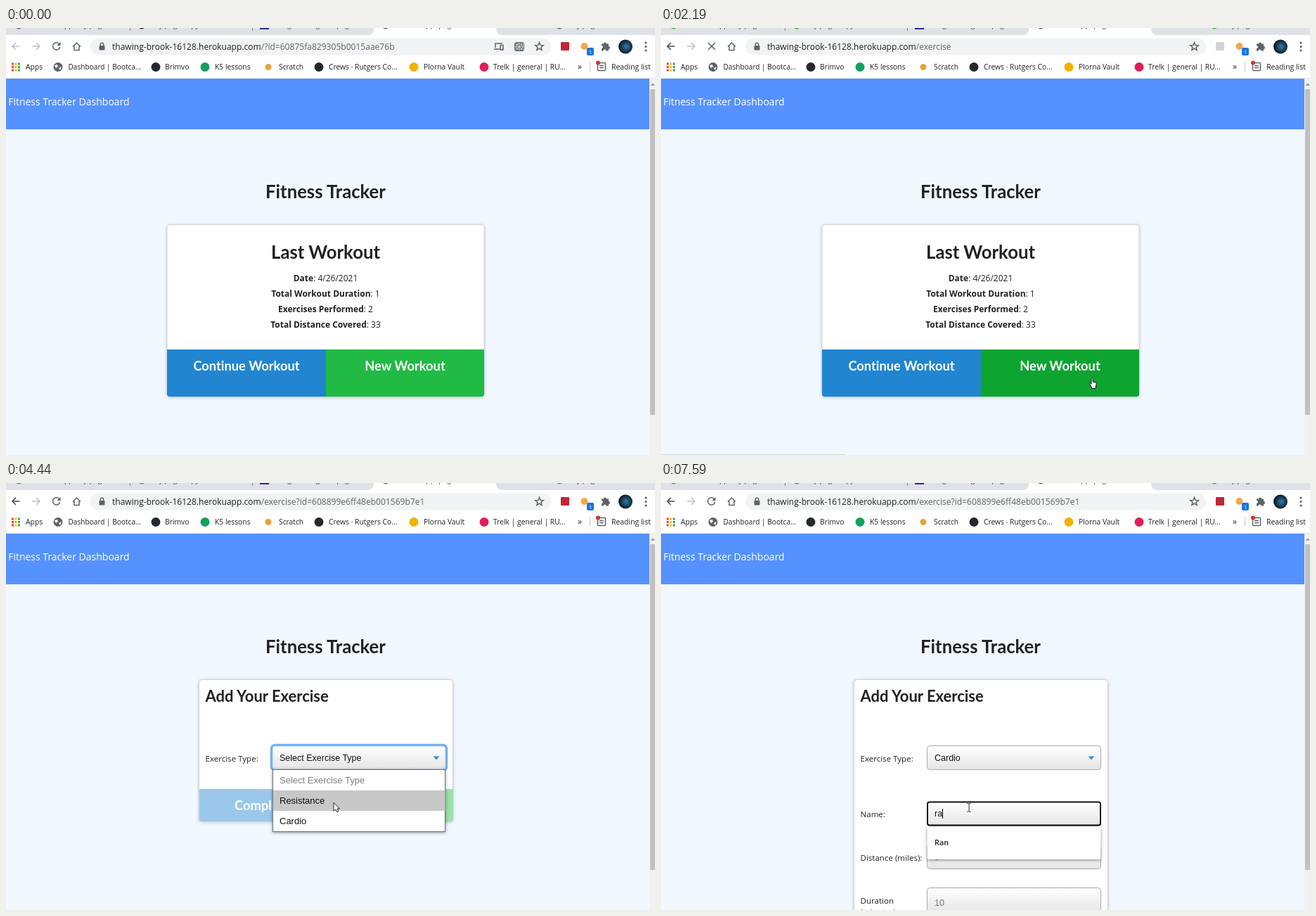
Animation of 923x607 px, one loop 8 s. Source, as an HTML page:

```html
<!DOCTYPE html>
<html lang="en">
<head>
<meta charset="utf-8">
<title>Fitness Tracker</title>
<style>
  html, body { margin: 0; width: 100%; height: 100%; overflow: hidden; background: #f1f8ff; }
  svg { display: block; width: 923px; height: 607px; }
  text { white-space: pre; font-variant-ligatures: none; }
  .ui { font-family: "Open Sans", "Noto Sans", sans-serif; }
  .head { font-family: Lato, sans-serif; font-weight: 700; }
  .ctl { font-family: "Liberation Sans", Arial, sans-serif; }
  .line { fill: none; stroke: #5f6368; stroke-width: 1.5; }
  .card { fill: #fff; stroke: #d0d3d7; filter: drop-shadow(0 1px 2px rgba(0, 0, 0, .2)); }
  .popup { fill: #fff; filter: drop-shadow(0 1px 2px rgba(0, 0, 0, .45)); }
</style>
</head>
<body>
<svg id="stage" viewBox="0 0 923 607" xmlns="http://www.w3.org/2000/svg"></svg>
<script>
const LOOP = 8000;
const INK = '#212121';
const GRAY = '#5f6368';
const H1 = 25.7, H2 = 22, BUTTON = 18.3;

// Markup helpers
const text = (cls, x, y, size, fill, body, extra = '') =>
  `<text class="${cls}" x="${x}" y="${y}" font-size="${size}" fill="${fill}" ${extra}>${body}</text>`;
const rect = (x, y, w, h, fill, extra = '') =>
  `<rect x="${x}" y="${y}" width="${w}" height="${h}" fill="${fill}" ${extra}/>`;
const dot = (x, y, r, fill, extra = '') =>
  `<circle cx="${x}" cy="${y}" r="${r}" fill="${fill}" ${extra}/>`;
const path = (d, extra = 'class="line"') => `<path d="${d}" ${extra}/>`;
const group = (id, body) => `<g id="${id}">${body}</g>`;
const mid = 'text-anchor="middle"';

const field = (y, id) =>
  rect(378.5, y + .5, 247, 34, 'url(#shade)', `rx="4" stroke="#a9a9a9" id="${id}"`);

function buttonPair(x0, xm, x1, y0, y1, left, right, id) {
  return path(`M${x0} ${y0}H${xm}V${y1}H${x0 + 4}a4 4 0 0 1-4-4Z`, `fill="${left}"`) +
    path(`M${xm} ${y0}H${x1}V${y1 - 4}a4 4 0 0 1-4 4H${xm}Z`, `fill="${right}" id="${id}"`);
}

function tabStrip() {
  const labels = [[33, 'Workout app, my page'], [208, 'my page copy'], [382, 'assignment guide page'],
    [555, 'Fitness app, page'], [802, 'my page']];
  const icons = [[18, GRAY], [193, INK], [367, '#26348b'], [540, GRAY], [787, GRAY]];
  return rect(0, 0, 923, 72, '#fff') +
    path('M0 0H523V2a8 8 0 0 1-8 8H0Z', 'fill="#dee1e6"') +
    path('M923 0H697V2a8 8 0 0 0 8 8H923Z', 'fill="#dee1e6"') +
    path('M176.5 0V4M350.5 0V4', 'stroke="#80868b"') +
    labels.map(([x, s]) => text('ui', x, -1, 10.4, '#45494d', s)).join('') +
    icons.map(([x, c], i) => i === 2 ? rect(361, -6, 13, 8, c) : dot(x, -4, 5.5, c, `id="tab${i}"`)).join('');
}

function toolbar() {
  const star = Array.from({ length: 10 }, (_, i) => {
    const r = i % 2 ? 2.6 : 6, a = i * Math.PI / 5;
    return `${758.5 + r * Math.sin(a)} ${26.5 - r * Math.cos(a)}`;
  }).join('L');
  const squares = [[725, 22], [731, 22], [725, 28], [731, 28]]
    .map(([x, y]) => rect(x, y, 3.5, 3.5, 'none', 'stroke="#5f6368" stroke-width="1.4"')).join('');
  return path('M19.5 26H9M14 21L9 26L14 31', 'class="line" id="back"') +
    path('M37 26H48M43 21L48 26L43 31', 'fill="none" stroke="#bdc1c6" stroke-width="1.5"') +
    group('reload', path('M76 23a5.2 5.2 0 1 0 .8 4') + path('M77.5 20V25H72.5Z', `fill="${GRAY}"`)) +
    group('stop', path('M67 21L77 31M77 21L67 31')) +
    path('M95 26.5L100.5 21L106 26.5M97 25.5V31.5H104V25.5') +
    rect(120, 14.5, 655, 24, '#f1f3f4', 'rx="12"') +
    rect(132.5, 25, 8, 6.5, GRAY, 'rx="1"') + path('M134.3 25V23.5a2.2 2.2 0 0 1 4.4 0V25') +
    text('ui', 151, 30.8, 12.05, INK, '', 'id="url"') +
    group('pageTools', path('M694 30H702M696 28V22H706M703 24.5H707V31H703Z') +
      rect(723.5, 20.5, 13, 12, 'none', 'rx="2" stroke="#5f6368"') + squares) +
    path(`M${star}Z`) +
    rect(789, 20, 12, 12, '#c0263a', 'id="shield" rx="1"') +
    dot(822.5, 26, 5, '#f3a84a') + rect(826, 28, 10, 11, '#1a73e8', 'rx="2"') +
    text('ui', 831, 36.8, 8, '#fff', '1', mid) +
    path('M847 22.5H850a2 2 0 1 1 4 0H857V26a2 2 0 1 1 0 4V32.5H853.5a2 2 0 0 0-4 0H847V29a2 2 0 0 0 0-4Z', `fill="${GRAY}"`) +
    dot(881, 26.5, 10, 'url(#avatar)') +
    [21, 26.5, 32].map(y => dot(910, y, 1.6, GRAY)).join('');
}

function bookmarks() {
  const hues = ['#ea4335', '#fbbc04', '#34a853', '#4285f4'];
  const apps = Array.from({ length: 9 }, (_, i) =>
    rect(8 + i % 3 * 4.5, 49.5 + Math.floor(i / 3) * 4.5, 3, 3, hues[(i + Math.floor(i / 3)) % 4])).join('');
  const marks = [[213, '#24292e', 226, 'Brimvo'], [283, '#12a15b', 297, 'K5 lessons'],
    [373, '#e9a13b', 388, 'Scratch'], [445, '#24292e', 459, 'Crews · Rutgers Co...'],
    [580, '#f0b400', 594, 'Plorna Vault'], [680, '#e01e5a', 693, 'Trelk | general | RU...']];
  return apps + text('ui', 28, 59.2, 10.4, INK, 'Apps') +
    dot(74, 55.5, 6.5, GRAY) + path('M69 53L73 52L74 55L71 57ZM75 57L79 55L77 60Z', 'fill="#fff"') +
    text('ui', 88.5, 59.2, 10.1, INK, 'Dashboard | Bootca...') +
    marks.map(([cx, c, x, s]) => dot(cx, 55.5, s === 'Scratch' ? 4.5 : 6.5, c) +
      text('ui', x, 59.2, 10.3, INK, s)).join('') +
    text('ui', 813, 59, 12, INK, '»') + rect(830, 48, 1, 14, '#c6c9cd') +
    rect(841.5, 49.5, 11, 11, 'none', 'rx="1" stroke="#5f6368" stroke-width="1.5"') +
    path('M844 53.5H850M844 56.5H850') + dot(842, 49.5, 3, '#c5392b') +
    text('ui', 861, 59.2, 10.45, INK, 'Reading list') +
    rect(0, 71, 923, 1, '#e3e6ea');
}

function workoutCard() {
  const stats = [['Date', '4/26/2021'], ['Total Workout Duration', 1], ['Exercises Performed', 2], ['Total Distance Covered', 33]];
  return rect(229, 279.5, 451, 244.5, '#fff', 'class="card" rx="4"') +
    text('head', 454.5, 328, H1, INK, 'Last Workout', mid) +
    stats.map(([k, v], i) => text('ui', 454.5, 360.3 + i * 21.8, 12, INK, `<tspan font-weight="700">${k}</tspan>: ${v}`, mid)).join('') +
    buttonPair(229, 455, 680, 457, 524, '#2185d0', '#21ba45', 'newButton') +
    text('head', 342, 486.6, BUTTON, '#fff', 'Continue Workout', mid) +
    text('head', 567.5, 486.6, BUTTON, '#fff', 'New Workout', mid);
}

function exerciseForm() {
  const label = (y, s) => text('ui', 283.5, y, 11.55, INK, s);
  const hint = (y, s, id) => text('ctl', 389, y, 12.5, '#777', s, `id="${id}"`);
  const item = (i, s) => text('ctl', 389, 426.8 + 29 * i, 13, i ? '#111' : '#7f7f7f', s);
  return rect(274.5, 279.5, 361, 201.5, '#fff', 'class="card" rx="4" id="formCard"') +
    text('head', 283.5, 310.7, H2, INK, 'Add Your Exercise') +
    group('formButtons', buttonPair(275, 455, 636, 435, 481, '#9bc8ea', '#9be0ab', 'addButton') +
      text('head', 364.5, 464.8, BUTTON, '#fff', 'Complete', mid) +
      text('head', 545, 464.8, BUTTON, '#fff', 'Add Exercise', mid)) +
    label(395.5, 'Exercise Type:') + field(373, 'select') +
    rect(377.5, 372.5, 249, 36, 'none', 'id="ring" rx="5" stroke="#74b0f4" stroke-width="3.5"') +
    text('ctl', 389, 395, 12.5, '#111', '', 'id="choice"') +
    path('M607.5 388.5H616.5L612 393.5Z', 'fill="#3a8fca"') +
    group('cardio', label(475, 'Name:') + field(453, 'nameField') +
      rect(379, 453.5, 246, 33, 'none', 'id="nameFocus" rx="3" stroke="#101010" stroke-width="2"') +
      hint(474.3, 'Running', 'nameText') +
      label(536.5, 'Distance (miles):') + field(514, 'distance') + hint(535.8, '5', 'distanceHint') +
      label(597.5, 'Duration') + label(613.5, '(minutes):') + field(575, 'duration') + hint(601, '10', 'durationHint')) +
    group('menu', rect(379.5, 407.5, 245, 88, '#fff', 'class="popup" stroke="#767676"') +
      rect(380, 408, 244.5, 29, '#c8c8c8', 'id="menuRow"') +
      item(0, 'Select Exercise Type') + item(1, 'Resistance') + item(2, 'Cardio')) +
    group('suggest', rect(378.5, 488, 247, 47, '#fff', 'class="popup" id="suggestBox" rx="2"') +
      ['first', 'second', 'third'].map((id, i) => text('ui', 389, 514.7 + 34 * i, 10.9, INK, '', `id="${id}" font-weight="600"`)).join('')) +
    rect(389, 463, 1, 14, '#000', 'id="caret"');
}

const cursors = {
  arrow: path('M0 0V12L2.8 9.4L4.8 13.5L6.8 12.6L4.9 8.6H8.6Z', 'fill="#fff" stroke="#111" stroke-width=".9" id="arrow"'),
  hand: path('M-1 1.3c0-1.7 2.2-1.7 2.2 0V6L4.8 6.8c1.1.3 1.5.9 1.4 1.9L5.5 13V15.5H-.5V13.5L-3.3 9.6C-4.1 8.3-2.7 7.6-1.8 8.5L-1 9.3Z', 'fill="#fff" stroke="#111" id="hand"'),
  beam: path('M-.7-5Q1.5-5 2-4Q2.5-5 4.7-5M2-4V6M-.7 7Q1.5 7 2 6Q2.5 7 4.7 7', 'fill="none" stroke="#333" id="beam"')
};

document.getElementById('stage').innerHTML = `
  <defs>
    <linearGradient id="shade" x2="0" y2="1"><stop stop-color="#fff"/><stop offset="1" stop-color="#e5e5e5"/></linearGradient>
    <radialGradient id="avatar" cx=".55" cy=".5"><stop stop-color="#2b7fb5"/><stop offset="1" stop-color="#101820"/></radialGradient>
  </defs>` +
  rect(0, 0, 923, 607, '#f1f8ff') + tabStrip() + toolbar() + bookmarks() +
  rect(0, 72, 915, 72, '#5592ff') + text('ui', 3.2, 110, 14, '#fff', 'Fitness Tracker Dashboard') +
  rect(915, 72, 8, 535, '#f1f1f1') + rect(916, 87, 7, 463, '#c1c1c1') + path('M916.5 82L920 78L923 82Z', 'fill="#a3a3a3"') +
  text('head', 454.5, 242, H1, INK, 'Fitness Tracker', mid) +
  group('workout', workoutCard()) + group('form', exerciseForm()) +
  rect(0, 606, 262, 1, '#d3d7dc', 'id="status"') +
  dot(0, 0, 11, '#ffe620', 'id="click" opacity=".72"') +
  group('cursor', cursors.arrow + cursors.hand + cursors.beam);

const $ = id => document.getElementById(id);
const show = (id, on) => { $(id).style.display = on ? '' : 'none'; };
const set = (id, attrs) => { for (const k in attrs) $(id).setAttribute(k, attrs[k]); };
const say = (id, s) => { if ($(id).textContent !== s) $(id).textContent = s; };
const within = (t, a, b) => t >= a && t < b;

// Pointer moves: start, end, steps, x, y
const moves = [[550, 730, 4, 613, 497], [2670, 2740, 2, 605, 470], [2810, 2950, 3, 508, 385],
  [4130, 4490, 7, 459, 466], [5480, 5610, 3, 444, 454], [5670, 5810, 3, 436, 460.5]];
const clicks = [[1540, 1700], [3700, 3880], [4830, 5050], [6040, 6300]];

function pointerAt(t) {
  let x = 913, y = 598;
  for (const [start, end, n, tx, ty] of moves) {
    if (t < start) break;
    const p = Math.min(n, Math.floor((t - start) / (end - start) * (n - 1) + 1e-6) + 1) / n;
    x += (tx - x) * p;
    y += (ty - y) * p;
  }
  return [x, y];
}

function urlAt(t) {
  const tail = t < 2190 ? '/?id=60875fa829305b0015aae76b'
    : t < 2450 ? '/exercise' : '/exercise?id=608899e6ff48eb001569b7e1';
  return `thawing-brook-16128.herokuapp.com<tspan fill="${GRAY}">${tail}</tspan>`;
}

let shownUrl = '';
function render(t) {
  const url = urlAt(t);
  if (url !== shownUrl) $('url').innerHTML = shownUrl = url;
  const loading = within(t, 1750, 2450);
  const moved = t >= 2190;
  show('stop', loading);
  show('reload', !loading);
  show('pageTools', !moved);
  $('back').style.stroke = moved ? '#45494d' : '#bdc1c6';
  set('shield', { fill: within(t, 2190, 2600) ? '#d0d3d6' : '#c0263a' });
  const fresh = t >= 1800;
  set('tab0', { fill: fresh ? '#3fa34d' : GRAY });
  set('tab1', { fill: fresh ? '#2fa52f' : INK });
  set('tab4', { fill: fresh ? '#2fb52f' : GRAY });

  const onForm = t >= 2310;
  show('workout', !onForm);
  show('form', onForm);
  set('newButton', { fill: t < 670 ? '#21ba45' : t < 1540 ? '#16ab39' : t < 1640 ? '#198f35' : '#0ea432' });
  show('status', within(t, 910, 2950));
  set('status', { width: onForm ? 303 : 262 });

  const [x, y] = pointerAt(t);
  const cardio = t >= 5050;
  const naming = t >= 6040;
  show('cardio', cardio);
  show('formButtons', !cardio);
  set('formCard', { height: cardio ? 400 : 201.5 });
  set('select', { stroke: within(t, 3000, 3450) ? '#8c8c8c' : '#a9a9a9' });
  show('ring', within(t, 3700, 6040));
  say('choice', cardio ? 'Cardio' : 'Select Exercise Type');
  show('menu', within(t, 3700, 5050));
  set('menuRow', { y: 408 + 29 * (y >= 465.9 ? 2 : y >= 437 ? 1 : 0) });

  const typed = t < 7410 ? '' : t < 7590 ? 'r' : 'ra';
  show('nameFocus', naming);
  say('nameText', typed || 'Running');
  set('nameText', { fill: typed ? '#111' : '#777' });
  show('suggest', naming);
  set('suggestBox', { height: typed ? 47 : 115 });
  say('first', 'Ran');
  say('second', typed ? '' : 'Jog');
  say('third', typed ? '' : 'Bike');
  show('caret', naming && !within(t, 6600, 7100));
  set('caret', { x: [389, 393, 400][typed.length] });

  show('click', clicks.some(([a, b]) => within(t, a, b)));
  set('click', { cx: x, cy: y });
  show('cursor', t >= 550);
  set('cursor', { transform: `translate(${x} ${y})` });
  const shape = cardio ? 'beam' : within(t, 670, 2310) ? 'hand' : 'arrow';
  for (const id in cursors) show(id, id === shape);
}

const began = performance.now();
function tick() {
  render((performance.now() - began) % LOOP);
  requestAnimationFrame(tick);
}
tick();
</script>
</body>
</html>
```
